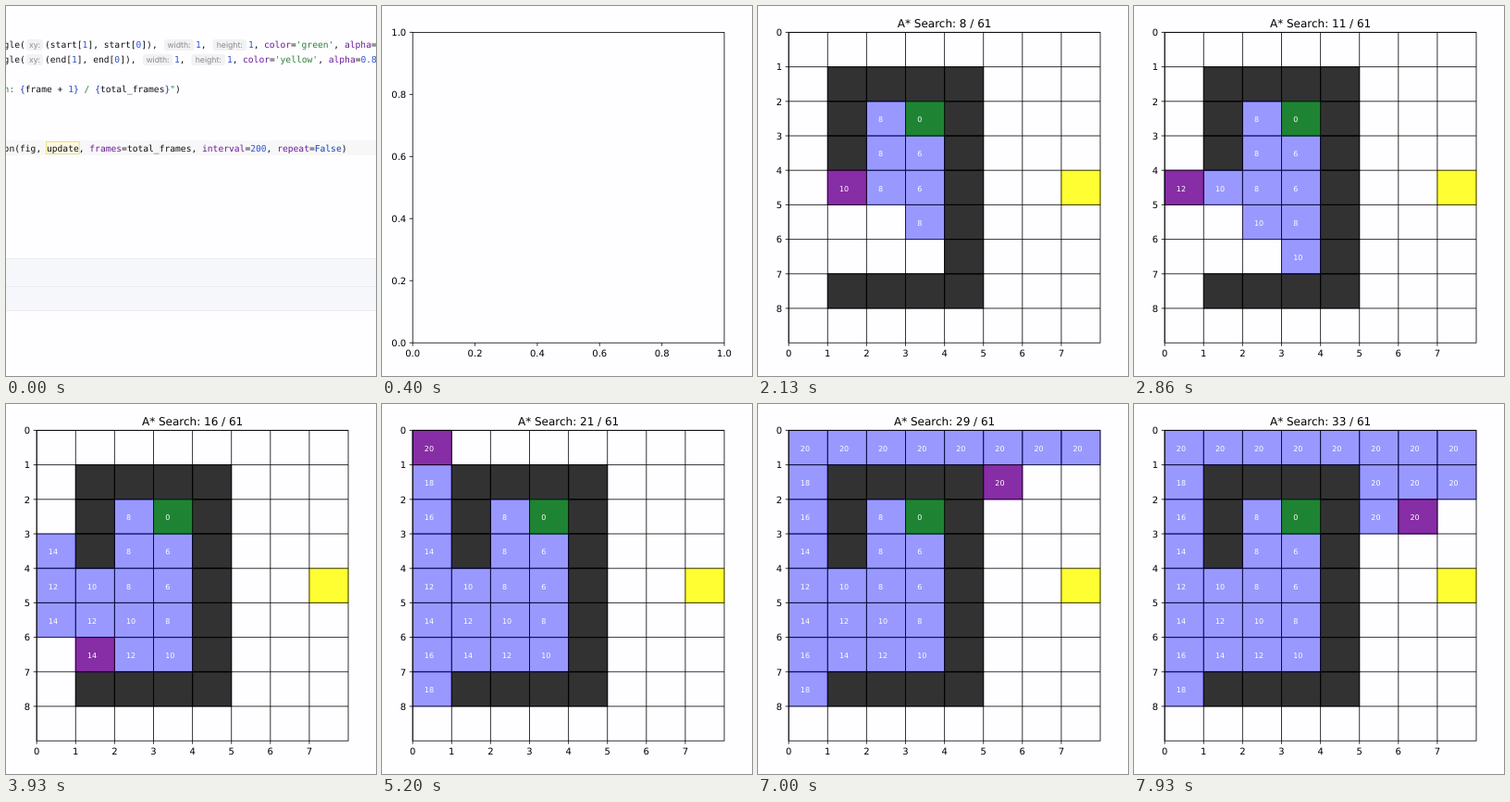
An HTML page for the animation above (8 s loop, 400x399 px).

```html
<!DOCTYPE html>
<html lang="en">
<head>
<meta charset="utf-8">
<title>A* Search</title>
<style>
html, body { margin: 0; width: 100%; height: 100%; overflow: hidden; background: #fefdff; }
svg { display: block; width: 100vw; height: 100vh; }
text { white-space: pre; text-rendering: geometricPrecision; }
#code text { font: 9.63px "DejaVu Sans Mono", monospace; fill: #111; }
#code text.hint { font: 8.7px Inter, sans-serif; fill: #8b8b8f; }
#plot text { font: 10px "DejaVu Sans", sans-serif; fill: #000; }
#plot text.title { font-size: 12px; }
#plot text.num { font-size: 8px; fill: #fff; }
.k { fill: #6a1b9a; } .s { fill: #2f8136; } .n { fill: #2f55d4; } .b { fill: #1a3fae; }
</style>
</head>
<body>
<svg id="stage" viewBox="0 0 400 399">
  <g id="code"></g>
  <g id="plot"></g>
</svg>
<script>
const NS = 'http://www.w3.org/2000/svg';
const LOOP = 8000, TOTAL = 61;
const X0 = 33.2, Y0 = 28.4, CW = 42.1, CH = 37.2, COLS = 8, ROWS = 9;
const X1 = X0 + COLS * CW, Y1 = Y0 + ROWS * CH;
const ADV = 5.8, PAPER = '#fefdff';

const OPENING = [[60, .35], [130, .8], [200, 1]];
const AXES_AT = 400;
const STEPS = [600, 800, 1000, 1260, 1460, 1660, 1860, 2130, 2400, 2600, 2800,
  3060, 3260, 3460, 3730, 3930, 4200, 4460, 4660, 4860, 5060, 5400, 5600, 5860,
  6060, 6260, 6460, 6730, 7000, 7200, 7460, 7660, 7930];

const MAP = [
  '........',
  '.####...',
  '.#.S#...',
  '.#..#...',
  '....#..G',
  '....#...',
  '....#...',
  '.####...',
  '........'];

const find = ch => {
  const r = MAP.findIndex(row => row.includes(ch));
  return [r, MAP[r].indexOf(ch)];
};
const start = find('S'), goal = find('G');

// A* with ties broken by row, then column
function search() {
  const open = [[0, ...start, 0]], seen = new Set([start.join()]), order = [];
  while (open.length) {
    open.sort((a, b) => a[0] - b[0] || a[1] - b[1] || a[2] - b[2]);
    const [f, r, c, g] = open.shift();
    order.push({ f, r, c });
    if (r === goal[0] && c === goal[1]) break;
    for (const [dr, dc] of [[0, 1], [1, 0], [0, -1], [-1, 0]]) {
      const y = r + dr, x = c + dc, key = y + ',' + x;
      if (!MAP[y] || !MAP[y][x] || MAP[y][x] === '#' || seen.has(key)) continue;
      seen.add(key);
      const h = Math.abs(goal[0] - y) + Math.abs(goal[1] - x);
      open.push([g + 1 + h, y, x, g + 1]);
    }
  }
  return order;
}
const order = search();

function el(parent, tag, attrs, text) {
  const e = document.createElementNS(NS, tag);
  for (const k in attrs) e.setAttribute(k, attrs[k]);
  if (text !== undefined) e.textContent = text;
  parent.append(e);
  return e;
}
const rect = (p, x, y, width, height, fill, more) =>
  el(p, 'rect', { x, y, width, height, fill, ...more });
const line = (p, x1, y1, x2, y2) =>
  el(p, 'line', { x1, y1, x2, y2, stroke: '#000', 'stroke-width': .8 });
const label = (p, x, y, s, anchor, cls = '') =>
  el(p, 'text', { x, y, 'text-anchor': anchor, class: cls }, s);
const show = (e, on) => e.setAttribute('visibility', on ? 'visible' : 'hidden');

// Editor view
const code = document.getElementById('code');

function run(x, y, parts) {
  const t = el(code, 'text', { x, y });
  for (const p of parts) {
    const [cls, s] = Array.isArray(p) ? p : ['', p];
    el(t, 'tspan', { class: cls }, s);
  }
}
function hint(x, y, w, s) {
  rect(code, x, y - 9, w, 12, '#f2f2f4', { rx: 2.5 });
  label(code, x + w / 2, y - .3, s, 'middle', 'hint');
}
function call(y, point, widthX, heightX, colorX, color, alpha) {
  run(-2.4, y, ['gle(']);
  hint(22, y, 18, 'xy:');
  run(42, y, point);
  hint(widthX, y, 32, 'width:');
  run(widthX + 34, y, [['n', '1'], ',']);
  hint(heightX, y, 36.5, 'height:');
  run(heightX + 38.5, y, [['n', '1'], ',']);
  run(colorX, y, [['k', 'color'], '=', ['s', color], ', ', ['k', 'alpha'], '=', ['n', alpha]]);
}
const point = v => [`(${v}[`, ['n', '1'], `], ${v}[`, ['n', '0'], ']),'];

rect(code, 0, 0, 400, 399, PAPER);
rect(code, 0, 145, 400, 16, '#f7f7f8');
rect(code, 0, 272, 400, 56.5, '#f6f7fa');
for (const y of [272, 302, 328]) rect(code, 0, y, 400, 1, '#ebecf0');
call(45, point('start'), 171, 223.5, 279, "'green'", '');
call(61, point('end'), 148, 200.5, 256, "'yellow'", '0.8');
run(-2.4, 93, [['s', 'n: '], ['b', '{'], 'frame + ', ['n', '1'], ['b', '}'], ['s', ' / '],
  ['b', '{'], 'total_frames', ['b', '}'], ['s', '"'], ')']);
rect(code, 43.5, 146.5, 6 * ADV + 1, 13, '#fbf9e4', { stroke: '#e9e27c', 'stroke-width': .9 });
run(-2.4, 156.5, ['on(fig, update, ', ['k', 'frames'], '=total_frames, ', ['k', 'interval'], '=',
  ['n', '200'], ', ', ['k', 'repeat'], '=', ['b', 'False'], ')']);

// Figure window
const plot = document.getElementById('plot');
rect(plot, 0, 0, 400, 399, PAPER);
const blank = el(plot, 'g'), chart = el(plot, 'g');

function xTick(p, x, s) {
  line(p, x, Y1, x, Y1 + 3.5);
  label(p, x, 378, s, 'middle');
}
function yTick(p, y, s) {
  line(p, X0 - 3.5, y, X0, y);
  label(p, 26.2, y + 3.8, s, 'end');
}
const frame = p =>
  rect(p, X0, Y0, X1 - X0, Y1 - Y0, 'none', { stroke: '#000', 'stroke-width': .8 });

for (let i = 0; i <= 5; i++) {
  const s = (i / 5).toFixed(1);
  xTick(blank, X0 + (X1 - X0) * i / 5, s);
  yTick(blank, Y1 - (Y1 - Y0) * i / 5, s);
}
frame(blank);

const patch = (r, c, color, alpha) => rect(chart, X0 + c * CW, Y0 + r * CH, CW, CH, color,
  { stroke: color, 'fill-opacity': alpha, 'stroke-opacity': alpha });

MAP.forEach((row, r) => [...row].forEach((ch, c) => ch === '#' && patch(r, c, '#000', .8)));

const cells = order.slice(0, STEPS.length).map(({ f, r, c }) => ({
  f, r, c,
  blue: patch(r, c, '#00f', .4),
  purple: patch(r, c, '#800080', .7)
}));
patch(...start, '#008000', .8);
patch(...goal, '#ff0', .8);

for (let i = 0; i < COLS; i++) {
  const x = X0 + i * CW;
  line(chart, x, Y0, x, Y1);
  xTick(chart, x, i);
}
for (let i = 0; i < ROWS; i++) {
  const y = Y0 + i * CH;
  line(chart, X0, y, X1, y);
  yTick(chart, y, i);
}
frame(chart);
for (const k of cells)
  k.num = label(chart, X0 + (k.c + .3) * CW, Y0 + (k.r + .6) * CH, k.f, 'start', 'num');
const title = label(chart, (X0 + X1) / 2, 22.5, '', 'middle', 'title');

function render(t) {
  let alpha = 0;
  for (const [at, a] of OPENING) if (t >= at) alpha = a;
  plot.setAttribute('opacity', alpha);

  const n = STEPS.filter(s => t >= s).length;
  blank.setAttribute('display', t >= AXES_AT && !n ? 'inline' : 'none');
  chart.setAttribute('display', n ? 'inline' : 'none');
  title.textContent = `A* Search: ${n} / ${TOTAL}`;
  cells.forEach((k, i) => {
    show(k.blue, i < n);
    show(k.num, i < n);
    show(k.purple, i > 0 && i === n - 1);
  });
}

const begin = performance.now();
function tick() {
  render((performance.now() - begin) % LOOP);
  requestAnimationFrame(tick);
}
render(0);
requestAnimationFrame(tick);
</script>
</body>
</html>
```
